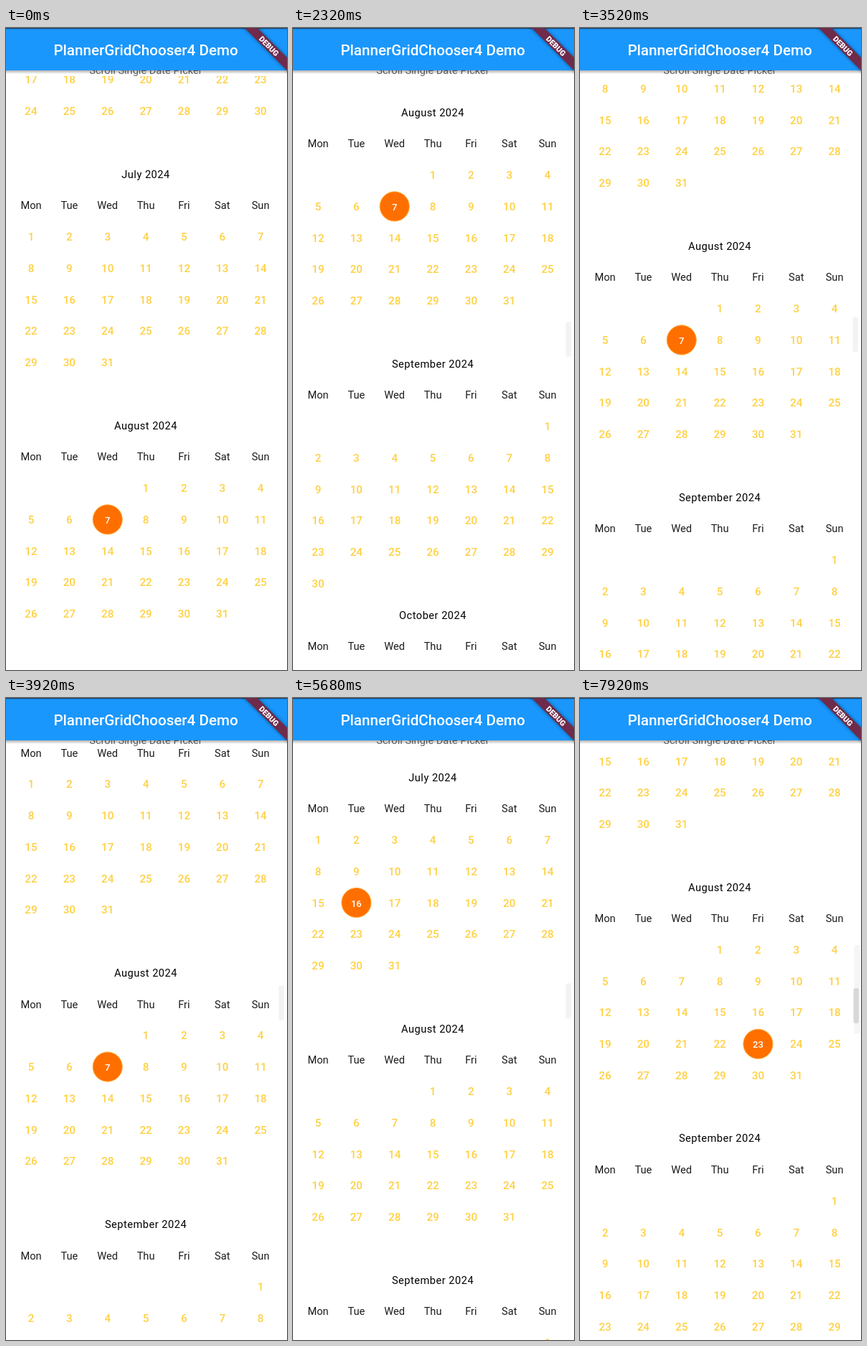
Animation, 392 px wide and 894 px high, one loop 8240 ms. Source, as an HTML page:

```html
<!DOCTYPE html>
<html lang="en">
<head>
<meta charset="utf-8">
<title>Scrolling calendar</title>
<style>
  html, body { margin: 0; width: 100%; height: 100%; overflow: hidden; background: #fff; }
  svg { display: block; width: 100%; height: 100%; }
  text { font-family: Roboto, sans-serif; font-size: 14.6px; text-anchor: middle; fill: #1c1c1c; }
  .month { letter-spacing: .5px; fill: #000; }
  .day { font-size: 15.2px; font-weight: 500; fill: #ffd042; }
  .picked { font-size: 13px; font-weight: 500; fill: #fff; }
  .label { fill: #666; }
  .title { font-size: 20.6px; font-weight: 500; fill: #fff; }
  .debug { font-size: 10.6px; font-weight: 900; fill: #fff; }
</style>
</head>
<body>
<svg id="stage" viewBox="0 0 392 894">
  <defs>
    <clipPath id="view"><rect y="67" width="392" height="827"/></clipPath>
    <linearGradient id="shade" x2="0" y2="1">
      <stop stop-color="#000" stop-opacity=".3"/>
      <stop offset="1" stop-color="#000" stop-opacity="0"/>
    </linearGradient>
    <filter id="soft" x="-20%" y="-100%" width="140%" height="300%"><feGaussianBlur stdDeviation="2.5"/></filter>
  </defs>
  <rect width="392" height="894" fill="#fff"/>
  <text class="label" x="195" y="64">Scroll Single Date Picker</text>
  <g clip-path="url(#view)"><g id="list"></g></g>
  <rect id="track" x="382.5" y="344" width="8" height="123" fill="#f5f5f5"/>
  <rect id="thumb" x="380.5" width="7.5" height="49" rx="3"/>
  <rect y="59" width="392" height="5" fill="url(#shade)"/>
  <rect width="392" height="59" fill="#1a97fd"/>
  <rect width="392" height="1.3" fill="#1d4468"/>
  <text class="title" x="195" y="38">PlannerGridChooser4 Demo</text>
  <g transform="translate(392 0) rotate(45)">
    <rect x="-60" y="29.2" width="120" height="12.5" fill="#000" opacity=".5" filter="url(#soft)"/>
    <rect x="-60" y="29.2" width="120" height="12.5" fill="#702a4a"/>
    <text class="debug" x="0" y="39.3">DEBUG</text>
  </g>
</svg>
<script>
const LOOP = 8240, STEP = 80, ROW = 43.75, COL = 53.35, LEFT = 35;
const MONTHS = ['June', 'July', 'August', 'September', 'October'];
const WEEK = ['Mon', 'Tue', 'Wed', 'Thu', 'Fri', 'Sat', 'Sun'];
const AUGUST = 7;
const $ = id => document.getElementById(id);
const list = $('list'), track = $('track'), thumb = $('thumb');

function add(parent, tag, attrs, content = '') {
  const el = document.createElementNS('http://www.w3.org/2000/svg', tag);
  for (const k in attrs) el.setAttribute(k, attrs[k]);
  el.textContent = content;
  parent.append(el);
  return el;
}

// Positions are relative to the August heading.
const label = (cls, x, y, str) => add(list, 'text', { class: cls, x, y: y + 5.2 }, str);
const disc = add(list, 'circle', { r: 20.6, fill: '#ff6f00', stroke: '#ffb03a', 'stroke-width': 1 });
const cells = {};

MONTHS.forEach((name, i) => {
  const m = i + 5, top = (m - AUGUST) * 8 * ROW;
  const first = (new Date(2024, m, 1).getDay() + 6) % 7;
  const count = new Date(2024, m + 1, 0).getDate();
  label('month', 195, top, name + ' 2024');
  WEEK.forEach((w, c) => label('', LEFT + c * COL, top + ROW, w));
  for (let d = 1; d <= count; d++) {
    const n = first + d - 1;
    const x = LEFT + n % 7 * COL, y = top + (2 + Math.floor(n / 7)) * ROW;
    cells[m + '-' + d] = { x, y, el: label('day', x, y, d) };
  }
});

// Eased track through [time, value] points.
function follow(points, t) {
  let [t0, v0] = points[0];
  for (const [t1, v1] of points) {
    if (t < t1) {
      const p = (t - t0) / (t1 - t0);
      const e = .5 * p + .5 * p * p * (3 - 2 * p);
      return v0 + (v1 - v0) * e;
    }
    [t0, v0] = [t1, v1];
  }
  return v0;
}

const SCROLL = [[0, 553.5], [1600, 553.5], [2320, 117.5], [2640, 117.5], [3520, 303.5], [4400, 482], [5560, 482], [6400, 263.3]];
const SHOWN = [[0, 0], [400, 0], [640, 1], [4960, 1], [5280, 0], [5520, 0], [5680, 1], [6960, 1], [7200, 0], [7280, 0], [7440, 1]];
const HOVER = [[0, 0], [480, 0], [720, 1], [1520, 1], [1760, 0], [7280, 0], [7680, 1]];

let picked = '';
function pick(key) {
  if (key === picked) return;
  if (picked) cells[picked].el.setAttribute('class', 'day');
  const { x, y, el } = cells[picked = key];
  el.setAttribute('class', 'picked');
  disc.setAttribute('cx', x);
  disc.setAttribute('cy', y - .3);
}

function draw(t) {
  const y = follow(SCROLL, t), shown = follow(SHOWN, t), hover = follow(HOVER, t);
  list.setAttribute('transform', `translate(0 ${y.toFixed(2)})`);
  pick(t < 5040 ? '7-7' : t < 7120 ? '6-16' : '7-23');
  const tone = Math.round(243 - 27 * hover);
  thumb.setAttribute('y', (394 + (553.5 - y) * .0344).toFixed(2));
  thumb.setAttribute('x', 380.5 + hover);
  thumb.setAttribute('fill', `rgb(${tone},${tone},${tone})`);
  thumb.setAttribute('opacity', shown);
  track.setAttribute('opacity', shown * hover);
}

const start = performance.now();
function tick() {
  const t = (performance.now() - start) % LOOP;
  draw(Math.floor(t / STEP) * STEP);
  requestAnimationFrame(tick);
}
tick();
</script>
</body>
</html>
```
